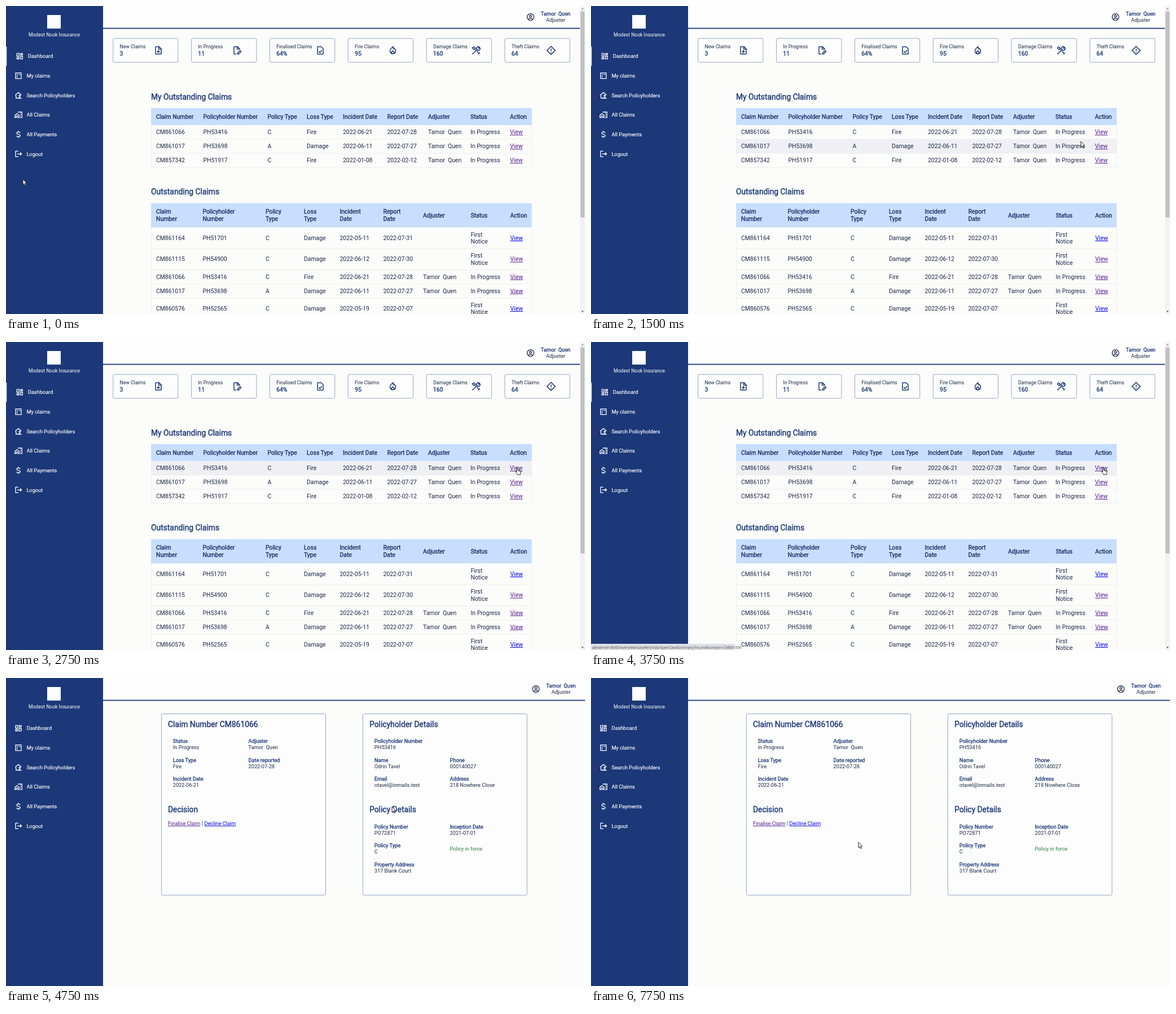
Recreate the animation shown at these times as an HTML page. Size 1026x546 px, loop 8 s.

```html
<!DOCTYPE html>
<html lang="en">
<head>
<meta charset="utf-8">
<title>Claims dashboard</title>
<style>
  html, body { margin: 0; width: 100%; height: 100%; overflow: hidden; background: #fcfcfb; }
  svg { display: block; width: 1026px; height: 546px; }
  text { font-family: Roboto, Arial, sans-serif; white-space: pre; }
  .link { text-decoration: underline; }
</style>
</head>
<body>
<svg id="stage" viewBox="0 0 1026 546" xmlns="http://www.w3.org/2000/svg"></svg>
<script>
const NAVY = '#1c3878', INK = '#1b2745', HEAD = '#172c60';
const BLUE = '#0000ee', PURPLE = '#551a8b';
const LOOP = 8000, STEP = 250;
const AGENT = 'Tamor  Quen';

// y is the middle of the capitals; bold thickens the regular weight.
function text(x, y, str, { size = 9.2, fill = INK, bold = 0, anchor = 'start', cls = '', font = '' } = {}) {
  const stroke = bold ? ` stroke="${fill}" stroke-width="${bold}"` : '';
  const family = font ? ` style="font-family:${font}"` : '';
  return `<text x="${x}" y="${(y + size * 0.356).toFixed(2)}" font-size="${size}" fill="${fill}" ` +
    `text-anchor="${anchor}" class="${cls}"${stroke}${family}>${str}</text>`;
}
const rect = (x, y, w, h, fill, extra = '') =>
  `<rect x="${x}" y="${y}" width="${w}" height="${h}" fill="${fill}" ${extra}/>`;
const panel = (x, y, w, h) => rect(x, y, w, h, '#fdfdfd', 'rx="2.5" stroke="#93a9c6"');
const title = (x, y, str) => text(x, y, str, { size: 13.85, fill: NAVY, bold: 0.4 });

// Icons live on a 24-unit grid, centred on (x, y).
const PAGE = 'M14 3H6Q5 3 5 4V20Q5 21 6 21H18Q19 21 19 20V8ZM13 3V9H19';
const ICONS = {
  add: PAGE + 'M12 11V19M8 15H16',
  edit: 'M11 21H6Q5 21 5 20V4Q5 3 6 3H14L19 8V10M13 3V9H19M14 21V18.5L20 12.5L22.5 15L16.5 21Z',
  done: 'M14 3H6Q5 3 5 4V20Q5 21 6 21H18Q19 21 19 20V8ZM8 14.3L11 17.2L16 11.8',
  fire: 'M13 3C8 6 5 9 5 13.5A7 7 0 0 0 19 13.5C19 11 18 9 16 7.3C14.500 9.600 12 8 13 3ZM12 13L9.800 15.300A3 3 0 1 0 14.200 15.300Z',
  tools: 'M4 20.500L14.500 10M20.500 20.500L13.500 13.500M3 6L6 3L10 7L7 10ZM9 9L11 11M14.500 10A4 4 0 0 1 19.500 3.500L17.500 6L18.500 7L21 5A4 4 0 0 1 14.500 10M3 19L5 21.500M18 21.500L21.500 18',
  alert: 'M12 2L22 12L12 22L2 12ZM12 7.500V13M12 15V17',
  user: 'M12 2.500A9.500 9.500 0 1 0 12 21.500A9.500 9.500 0 1 0 12 2.500M12 6.500A3 3 0 1 0 12 12.500A3 3 0 1 0 12 6.500M5.500 18.500Q12 12.500 18.500 18.500',
  grid: 'M4 4H10V12H4ZM14 4H20V8H14ZM14 12H20V20H14ZM4 16H10V20H4Z',
  list: 'M4 4H20V20H4ZM7 8H10M7 12H10M7 16H10M13 8.500H17',
  search: 'M21 11L12 4L3 11M5 10V20H11M15.500 11A2.300 2.300 0 1 0 15.500 15.600A2.300 2.300 0 1 0 15.500 11M11.500 20.500Q15.500 16 19.500 20.500Z',
  homes: 'M2 13L8 8.500L14 13V20H10V15H6V20H2ZM10 4H22V20H17M17 8H19M17 12H19M17 16H19',
  money: 'M17 8Q16 5 12 5Q7.500 5 7.500 8.500Q7.500 11 12 12Q17 13 17 16Q17 19 12 19Q7.500 19 7 16M12 2V5M12 19V22',
  exit: 'M12 4H4V20H12M9 12H21M17 8L21 12L17 16'
};
const icon = (name, x, y, scale, color) =>
  `<path d="${ICONS[name]}" transform="translate(${x} ${y}) scale(${scale}) translate(-12 -12)" ` +
  `fill="none" stroke="${color}" stroke-width="2.1"/>`;

function sidebar(active) {
  const items = [['grid', 'Dashboard'], ['list', 'My claims'], ['search', 'Search Policyholders'],
    ['homes', 'All Claims'], ['money', 'All Payments'], ['exit', 'Logout']];
  return rect(0, 0, 172, 546, NAVY) + rect(73, 16, 24, 24, '#fff') +
    text(85.5, 51, 'Modest Nook Insurance', { size: 8.6, fill: '#fff', anchor: 'middle' }) +
    items.map(([name, label], i) => {
      const y = 89 + i * 34.65, shift = active && !i ? 2.3 : 0;
      return icon(name, 22 + shift, y, 0.62, '#fff') +
        text(36.4 + shift, y + 0.2, label, { size: 9.25, fill: '#fff', bold: 0.15 });
    }).join('') + (active ? rect(0, 72, 1.2, 34, '#fff') : '');
}

const header = (right, userX) =>
  rect(172, 0, right - 172, 39, '#fefefe') + rect(172, 38.7, right - 172, 1.8, NAVY) +
  icon('user', userX - 44.5, 19.5, 0.62, INK) +
  text(userX, 14, AGENT, { fill: NAVY, bold: 0.3, anchor: 'middle' }) +
  text(userX, 24.7, 'Adjuster', { anchor: 'middle' });

function table(cols, heads, rows, top, headH, edges) {
  const bottom = edges[edges.length - 1];
  const lines = (x, y, str, opt) => {
    const parts = str.split('/');
    return parts.map((p, i) => text(x, y + (i - (parts.length - 1) / 2) * 12.6, p, opt)).join('');
  };
  let out = `<path d="M257.500 ${top}V${bottom}M931.500 ${top}V${bottom}" stroke="#eeeff2"/>` +
    rect(257, top, 674.5, headH, '#c8deff');
  heads.split('|').forEach((h, i) => {
    out += lines(cols[i], top + headH / 2, h, { size: 10.4, fill: HEAD, bold: 0.32 });
  });
  rows.forEach((row, r) => {
    const y = (edges[r] + edges[r + 1]) / 2;
    out += rect(257, edges[r + 1] - 0.5, 674.5, 1, '#eeeff2');
    row.split('|').forEach((cell, i) => { out += lines(cols[i], y, cell, { size: 10.4 }); });
  });
  return out;
}
const view = (x, y, color) => text(x, y, 'View', { size: 10.4, fill: color, cls: 'link' });

const ROWS = [211, 236, 261, 286];

function dashboard() {
  const cards = [['New Claims', '3', 'add', 270], ['In Progress', '11', 'edit', 409],
    ['Finalised Claims', '64%', 'done', 557], ['Fire Claims', '95', 'fire', 685.5],
    ['Damage Claims', '160', 'tools', 833], ['Theft Claims', '64', 'alert', 966]];
  const tail = AGENT + '|In Progress';
  const mine = ['CM861066|PH53416|C|Fire|2022-06-21|2022-07-28|' + tail,
    'CM861017|PH53698|A|Damage|2022-06-11|2022-07-27|' + tail,
    'CM857342|PH51917|C|Fire|2022-01-08|2022-02-12|' + tail];
  const open = ['CM861164|PH51701|C|Damage|2022-05-11|2022-07-31||First/Notice',
    'CM861115|PH54900|C|Damage|2022-06-12|2022-07-30||First/Notice',
    mine[0], mine[1], 'CM860576|PH52565|C|Damage|2022-05-19|2022-07-07||First/Notice'];
  const openEdges = [392.5, 430, 467.5, 492.5, 517.5, 555];
  const heads = 'Claim Number|Policyholder Number|Policy Type|Loss Type|Incident Date|Report Date|Adjuster|Status|Action';
  return header(1017, 974) +
    cards.map(([label, value, name, ix], i) => {
      const x = 189.7 + i * 138.85;
      return panel(x, 57.5, 115.3, 42.3) + text(x + 11.8, 72.3, label, { size: 8.67 }) +
        text(x + 11.8, 84.2, value, { size: 10.4, fill: NAVY, bold: 0.32 }) + icon(name, ix, 78.7, 0.72, NAVY);
    }).join('') +
    title(257, 160.8, 'My Outstanding Claims') + title(257, 329.5, 'Outstanding Claims') +
    rect(257, 0, 674.5, 25, '#f0f0f4', 'id="hover"') +
    table([266, 349.5, 463.5, 533, 597, 675.5, 748, 823, 893], heads, mine, 181, 30, ROWS) +
    mine.map((_, i) => view(893, 223.5 + i * 25, PURPLE)).join('') +
    table([266, 348.5, 460, 528, 591.5, 668.5, 739, 823.5, 893.5],
      heads.replace(/(Claim|Policyholder|Policy|Loss|Incident|Report) /g, '$1/'), open, 349.5, 43, openEdges) +
    open.map((_, i) => view(893.5, (openEdges[i] + openEdges[i + 1]) / 2, i % 4 ? PURPLE : BLUE)).join('') +
    rect(1017, 0, 9, 546, '#f2f2f2') + rect(1018, 9.5, 7.2, 365.5, '#c1c1c1') +
    '<path d="M1019.500 6L1021.600 3.500L1023.700 6Z" fill="#909090"/>' +
    '<path d="M1019.500 540.500L1021.600 543L1023.700 540.500Z" fill="#505050"/>';
}

function details() {
  const field = (x, y, label, value) =>
    text(x, y, label, { fill: NAVY, bold: 0.3 }) + text(x, y + 10.8, value);
  return header(1026, 983.5) + panel(275.5, 63.5, 291, 321.5) + panel(632.2, 63.5, 291, 321.5) +
    title(287, 82, 'Claim Number CM861066') + title(287, 233, 'Decision') +
    title(644, 82, 'Policyholder Details') + title(644, 233, 'Policy Details') +
    field(295.8, 112.2, 'Status', 'In Progress') + field(429.6, 112.2, 'Adjuster', AGENT) +
    field(295.8, 145.7, 'Loss Type', 'Fire') + field(429.6, 145.7, 'Date reported', '2022-07-28') +
    field(295.8, 179.2, 'Incident Date', '2022-06-21') +
    text(287, 257.6, 'Finalise Claim', { fill: PURPLE, cls: 'link' }) + text(346.7, 257.6, '|') +
    text(351.4, 257.6, 'Decline Claim', { fill: BLUE, cls: 'link' }) +
    field(652.8, 112.2, 'Policyholder Number', 'PH53416') +
    field(652.8, 145.7, 'Name', 'Odrin Tavel') + field(786.6, 145.7, 'Phone', '000140027') +
    field(652.8, 179.2, 'Email', 'otavel@inmails.test') + field(786.6, 179.2, 'Address', '218 Nowhere Close') +
    field(652.8, 263.5, 'Policy Number', 'PO72871') + field(786.6, 263.5, 'Inception Date', '2021-07-01') +
    field(652.8, 297, 'Policy Type', 'C') + text(786.6, 302.5, 'Policy in force', { fill: '#2a7a34' }) +
    field(652.8, 330.5, 'Property Address', '317 Blank Court');
}

const statusBar = '<path d="M0 535H253Q255 535 255 537V546H0Z" fill="#dcdfe4"/>' +
  text(2, 541.2, 'devserver:4040/overview/caseRecords/openCaseSummary?recordNumber=CM861066',
    { size: 6.6, fill: '#50545c', font: "'Open Sans','Noto Sans',sans-serif" });

const stage = document.getElementById('stage');
stage.innerHTML = rect(0, 0, 1026, 546, '#fcfcfb') +
  `<g id="dash">${sidebar(true)}${dashboard()}</g><g id="claim">${sidebar(false)}${details()}</g>` +
  `<g id="status">${statusBar}</g>` +
  `<g id="cursor" stroke="#111" stroke-width=".9" stroke-linejoin="round" fill="#fff">
    <path id="arrow" d="M0 0V9.800L2.200 7.900L3.700 11.500L5.400 10.800L3.900 7.300H6.600Z"/>
    <path id="hand" d="M-1 8V1Q0 -.6 1 1V5L5 5.900Q6.300 6.300 6.200 7.800L5.400 13H.3C-.5 11 -2.500 9.500 -3 7.600Q-2.300 6.300 -1 8M2.700 5.400V7.500M4.400 5.800V7.600"/>
  </g>`;
const el = id => document.getElementById(id);
const show = (id, on) => el(id).setAttribute('visibility', on ? 'visible' : 'hidden');

// Pointer waypoints: time, x, y
const PATH = [[0, 30, 307], [250, 30, 310], [750, 430, 290], [1000, 690, 222], [1250, 838, 256],
  [1500, 868, 240], [2000, 892, 238], [2500, 905, 217], [2750, 906, 222], [3500, 906, 222],
  [3750, 908, 222], [4000, 905, 221.5], [4250, 903, 222], [4750, 684, 228], [5500, 450, 160],
  [6000, 343, 178], [6250, 371, 206], [7250, 473, 290], [7750, 474, 291]];

function pointerAt(t) {
  const i = PATH.findIndex(p => p[0] > t);
  if (i < 0) return PATH[PATH.length - 1].slice(1);
  const [t0, x0, y0] = PATH[i - 1], [t1, x1, y1] = PATH[i];
  const k = (t - t0) / (t1 - t0);
  return [x0 + (x1 - x0) * k, y0 + (y1 - y0) * k];
}

function render(now) {
  const t = Math.floor(now % LOOP / STEP) * STEP;
  const [x, y] = pointerAt(t);
  const onDash = t < 4000;
  const row = x > 257 && x < 931 ? ROWS.findIndex((top, i) => y >= top && y < ROWS[i + 1]) : -1;
  const onLink = onDash && row >= 0 && x > 892 && Math.abs(y - ROWS[row] - 12.5) < 8;
  show('dash', onDash);
  show('claim', !onDash);
  show('hover', onDash && row >= 0);
  if (row >= 0) el('hover').setAttribute('y', ROWS[row]);
  show('status', t >= 3000 && t < 4250);
  show('arrow', !onLink);
  show('hand', onLink);
  el('cursor').setAttribute('transform', `translate(${x.toFixed(1)} ${y.toFixed(1)})`);
}

const start = performance.now();
function tick() {
  render(performance.now() - start);
  requestAnimationFrame(tick);
}
tick();
</script>
</body>
</html>
```
